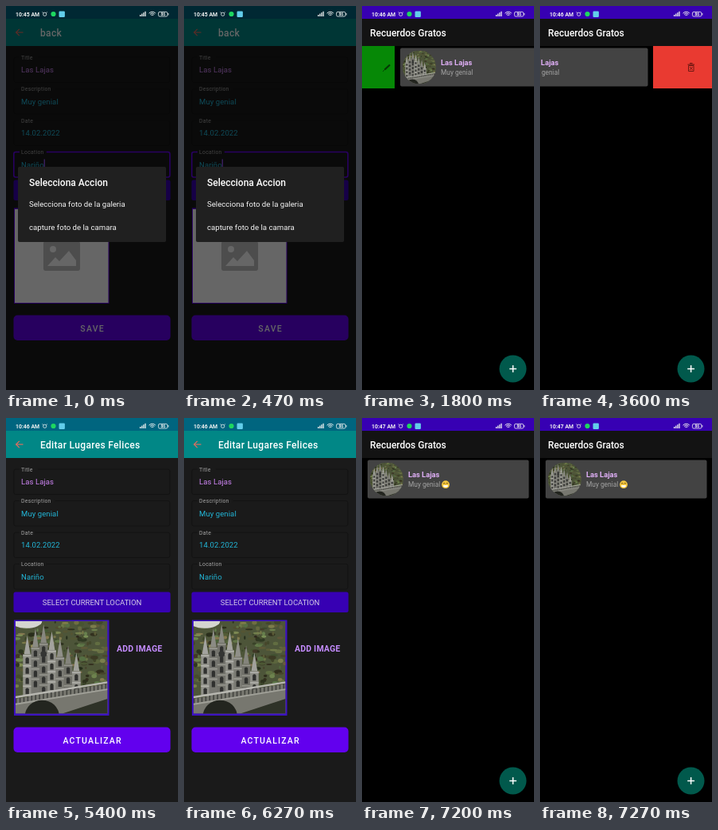
Recreate the animation shown at these times as an HTML page with a canvas. Size 216 by 480 pixels, loop 8000 ms.

```html
<!DOCTYPE html>
<html lang="es">
<head>
<meta charset="utf-8">
<title>Lugares</title>
<style>
html, body { margin: 0; width: 100%; height: 100%; overflow: hidden; background: #000; }
canvas { display: block; width: 100vw; height: 100vh; }
</style>
</head>
<body>
<canvas id="stage"></canvas>
<script>
const W = 216, H = 480, LOOP = 8000;
const BAR = 16, HEADER = 50, LEFT = 9.5, WIDTH = 197;
const PURPLE = '#6200ee', DEEP = '#3700b3', CYAN = '#22b5d6';
const canvas = document.getElementById('stage');
const ctx = canvas.getContext('2d');

function rect(x, y, w, h, color) {
  ctx.fillStyle = color;
  ctx.fillRect(x, y, w, h);
}

function round(x, y, w, h, r, color) {
  ctx.beginPath();
  ctx.roundRect(x, y, w, h, r);
  ctx.fillStyle = color;
  ctx.fill();
}

function frame(x, y, w, h, r, color, width) {
  ctx.beginPath();
  ctx.roundRect(x, y, w, h, r);
  ctx.strokeStyle = color;
  ctx.lineWidth = width;
  ctx.stroke();
}

function oval(x, y, rx, ry, color) {
  ctx.beginPath();
  ctx.ellipse(x, y, rx, ry, 0, 0, Math.PI * 2);
  ctx.fillStyle = color;
  ctx.fill();
}

const disc = (x, y, r, color) => oval(x, y, r, r, color);

function arc(x, y, r, from, to, color, width) {
  ctx.beginPath();
  ctx.arc(x, y, r, from * Math.PI, to * Math.PI);
  ctx.strokeStyle = color;
  ctx.lineWidth = width;
  ctx.stroke();
}

function trace(points) {
  ctx.beginPath();
  for (let i = 0; i < points.length; i += 2) ctx.lineTo(points[i], points[i + 1]);
}

function poly(color, ...points) {
  trace(points);
  ctx.fillStyle = color;
  ctx.fill();
}

function line(color, width, ...points) {
  trace(points);
  ctx.strokeStyle = color;
  ctx.lineWidth = width;
  ctx.stroke();
}

function text(str, x, y, size, color, weight = 400, spacing = 0, align = 'left') {
  ctx.font = `${weight} ${size}px Roboto, sans-serif`;
  ctx.letterSpacing = spacing + 'px';
  ctx.textAlign = align;
  ctx.fillStyle = color;
  ctx.fillText(str, x, y);
}

function seeded(seed) {
  return () => (seed = (seed * 16807) % 2147483647) / 2147483647;
}

function statusBar(time) {
  const white = '#f2f2f2';
  text(time, 12, 13.2, 6.9, white, 700);
  arc(48.7, 10.3, 2.1, 0, 2, white, 0.8);
  for (const side of [-1, 1]) line(white, 0.7, 48.7 + side * 3.2, 7.5, 48.7 + side * 1.7, 8.8);
  disc(59.5, 10, 3.1, '#1ed760');
  round(66.5, 6.5, 7.4, 7.4, 1.2, '#62cdea');
  for (let i = 0; i < 4; i++) rect(168 + i * 2.1, 11 - i * 1.4, 1.3, 2 + i * 1.4, white);
  for (let i = 1; i < 4; i++) arc(183.7, 13, i * 1.9, -0.76, -0.24, white, 1);
  frame(191.4, 7.4, 11.4, 5.6, 1.6, white, 0.8);
  rect(203.4, 9, 0.9, 2.4, white);
  text('86', 194.4, 12.1, 4.8, white, 700);
}

function tower(x, peak, shade) {
  const shoulder = peak + 24;
  poly(`hsl(60 3% ${shade + 8}%)`, x - 4, shoulder, x, peak, x + 4, shoulder);
  rect(x - 5.5, shoulder, 11, 96 - shoulder, `hsl(60 3% ${shade}%)`);
  for (let y = shoulder + 4; y < 86; y += 13) {
    rect(x - 5.5, y - 3, 11, 1.5, `hsl(60 4% ${shade + 15}%)`);
    round(x - 2.2, y, 4.4, 8, [2, 2, 0, 0], '#30312f');
  }
}

// A church above a bridge on a green slope, in a 118 x 118 box.
function photo(x, y, size) {
  ctx.save();
  ctx.translate(x, y);
  ctx.scale(size / 118, size / 118);
  ctx.beginPath();
  ctx.rect(0, 0, 118, 118);
  ctx.clip();
  rect(0, 0, 118, 118, '#4d5539');
  const rnd = seeded(71);
  for (let i = 0; i < 260; i++) {
    const hue = 35 + rnd() * 60;
    oval(rnd() * 118, rnd() * 84, 1 + rnd() * 4, 1 + rnd() * 2, `hsl(${hue} 25% ${14 + rnd() * 32}%)`);
  }
  oval(14, 0, 20, 9, '#d4d5d0');
  for (let i = 0; i < 7; i++) tower(15 + i * 10.5, 2 + 9 * Math.abs(i - 1.8), 48 + 7 * Math.cos(i * 2));
  disc(36, 42, 4, '#343533');
  poly('#77776f', 0, 99, 118, 80, 118, 118, 0, 118);
  for (let i = 0; i < 24; i++) rect(i * 5, 98 - i * 0.8, 1.5, 7, '#3f403c');
  line('#b7b7b0', 2.5, 0, 97, 118, 78);
  line('#a0a098', 2, 0, 106, 118, 87);
  poly('#2e3227', 60, 118, 118, 99, 118, 118);
  oval(34, 121, 22, 20, '#23251f');
  ctx.restore();
}

function placeholder() {
  rect(11, 254, 117.5, 117, '#fff');
  round(47, 294, 46, 37, 3, '#c0c0c0');
  disc(59, 304, 4, '#fff');
  poly('#fff', 52, 325, 62, 314, 67, 319, 79, 306, 88, 318, 88, 325);
}

function field(label, value, y, color, focused) {
  frame(9.8, y, 196, 31.5, 2.5, focused ? PURPLE : '#121212', focused ? 1.6 : 0.9);
  rect(17, y - 2, label.length * 3.6 + 5, 4, '#1a1a1a');
  text(label, 19, y + 2.6, 6.9, '#a2a2a2', 400, 0.25);
  text(value, 19, y + 19.2, 9.5, color, 400, 0.1);
}

function form({ title, action, editing }) {
  const center = LEFT + WIDTH / 2;
  rect(0, 0, W, H, '#1a1a1a');
  rect(0, 0, W, BAR, '#00657f');
  rect(0, BAR, W, HEADER - BAR, '#018786');
  line('#ef6c5e', 1.1, 21.5, 33, 12.8, 33);
  line('#ef6c5e', 1.1, 16.8, 28.8, 12.6, 33, 16.8, 37.2);
  text(title, 43, 38, 12, '#fff', 500, 0.33);

  const values = { Title: 'Las Lajas', Description: 'Muy genial', Date: '14.02.2022', Location: 'Nariño' };
  Object.entries(values).forEach(([label, value], i) => {
    field(label, value, 64 + i * 39.5, i ? CYAN : '#cf86f5', editing && i === 3);
  });
  round(LEFT, 217.5, WIDTH, 25.5, 2.5, DEEP);
  text('SELECT CURRENT LOCATION', center, 234.4, 9.5, '#d3cbe6', 400, 0, 'center');
  if (editing) rect(47.6, 191.5, 1.3, 11.5, '#9a55ff');
  rect(10, 252.5, 119.5, 119.5, editing ? PURPLE : '#3c12c0');
  if (editing) placeholder();
  else photo(12, 254, 115.5);
  text('ADD IMAGE', 139, 292.2, 10.4, '#c58cff', 700, 0.25);
  round(LEFT, 386.5, WIDTH, 31.5, 5, PURPLE);
  text(action, center + 0.6, 406.5, 10.5, '#fff', 500, 1.2, 'center');
}

function dialogScene() {
  form({ title: 'back', action: 'SAVE', editing: true });
  rect(0, 0, W, H, 'rgba(0,0,0,.6)');
  round(15, 201, 186, 94, 2, '#202020');
  text('Selecciona Accion', 29, 224.5, 12, '#fff', 500);
  text('Selecciona foto de la galeria', 29, 250.7, 9.65, '#f4f4f4');
  text('capture foto de la camara', 29, 279.5, 9.65, '#f4f4f4');
  statusBar('10:45 AM');
}

function editScene() {
  form({ title: 'Editar Lugares Felices', action: 'ACTUALIZAR' });
  statusBar('10:46 AM');
}

function pencil() {
  line('#063706', 2.2, 28.5, 79.5, 35, 73.5);
  line('#063706', 0.8, 26, 82, 29, 79);
}

function bin() {
  const ink = '#701812';
  frame(186.5, 74.5, 6.5, 7, 0, ink, 1);
  rect(185.5, 72.6, 8.5, 1.1, ink);
  rect(188, 71, 3.5, 1.2, ink);
  line(ink, 0.9, 188, 76, 191.5, 80);
  line(ink, 0.9, 191.5, 76, 188, 80);
}

function grin(x, y) {
  disc(x, y, 4.9, '#f6c93f');
  for (const side of [-1.8, 1.8]) arc(x + side, y - 0.9, 1, 1, 2, '#5a3a12', 0.8);
  round(x - 3, y + 0.7, 6, 2.7, [0.5, 0.5, 2, 2], '#fff');
}

function card(shift, happy) {
  ctx.save();
  ctx.translate(shift, 0);
  round(7, 52.5, 202.5, 48, 2, '#434343');
  ctx.save();
  ctx.beginPath();
  ctx.arc(31, 76.5, 21, 0, Math.PI * 2);
  ctx.clip();
  photo(10, 55.5, 42);
  ctx.restore();
  text('Las Lajas', 58, 74.3, 9.3, '#e1b0f8', 700);
  text('Muy genial', 58, 86.4, 8.35, '#a2a2a2');
  if (happy) grin(105, 83.2);
  ctx.restore();
}

function listScene(time, shift, happy) {
  rect(0, 0, W, H, '#000');
  rect(0, 0, W, BAR, DEEP);
  rect(0, BAR, W, HEADER - BAR, '#131313');
  text('Recuerdos Gratos', 10, 38, 12, '#fff', 500);
  if (shift > 0) {
    rect(0, HEADER, shift, 53, '#068806');
    pencil();
  } else if (shift < 0) {
    rect(W + shift, HEADER, -shift, 53, '#e93a31');
    bin();
  }
  card(shift, happy);
  disc(189.5, 453.5, 17, '#01594c');
  rect(185.2, 452.8, 8.8, 1.5, '#fff');
  rect(188.85, 449.1, 1.5, 8.8, '#fff');
  statusBar(time);
}

function draw(t) {
  if (t < 1800) dialogScene();
  else if (t < 3600) listScene('10:46 AM', 41);
  else if (t < 5400) listScene('10:46 AM', -74);
  else if (t < 7200) editScene();
  else listScene('10:47 AM', 0, true);
}

function resize() {
  const ratio = window.devicePixelRatio || 1;
  canvas.width = Math.round(innerWidth * ratio);
  canvas.height = Math.round(innerHeight * ratio);
}

function tick() {
  ctx.setTransform(canvas.width / W, 0, 0, canvas.height / H, 0, 0);
  draw(performance.now() % LOOP);
  requestAnimationFrame(tick);
}

addEventListener('resize', resize);
resize();
tick();
</script>
</body>
</html>
```
